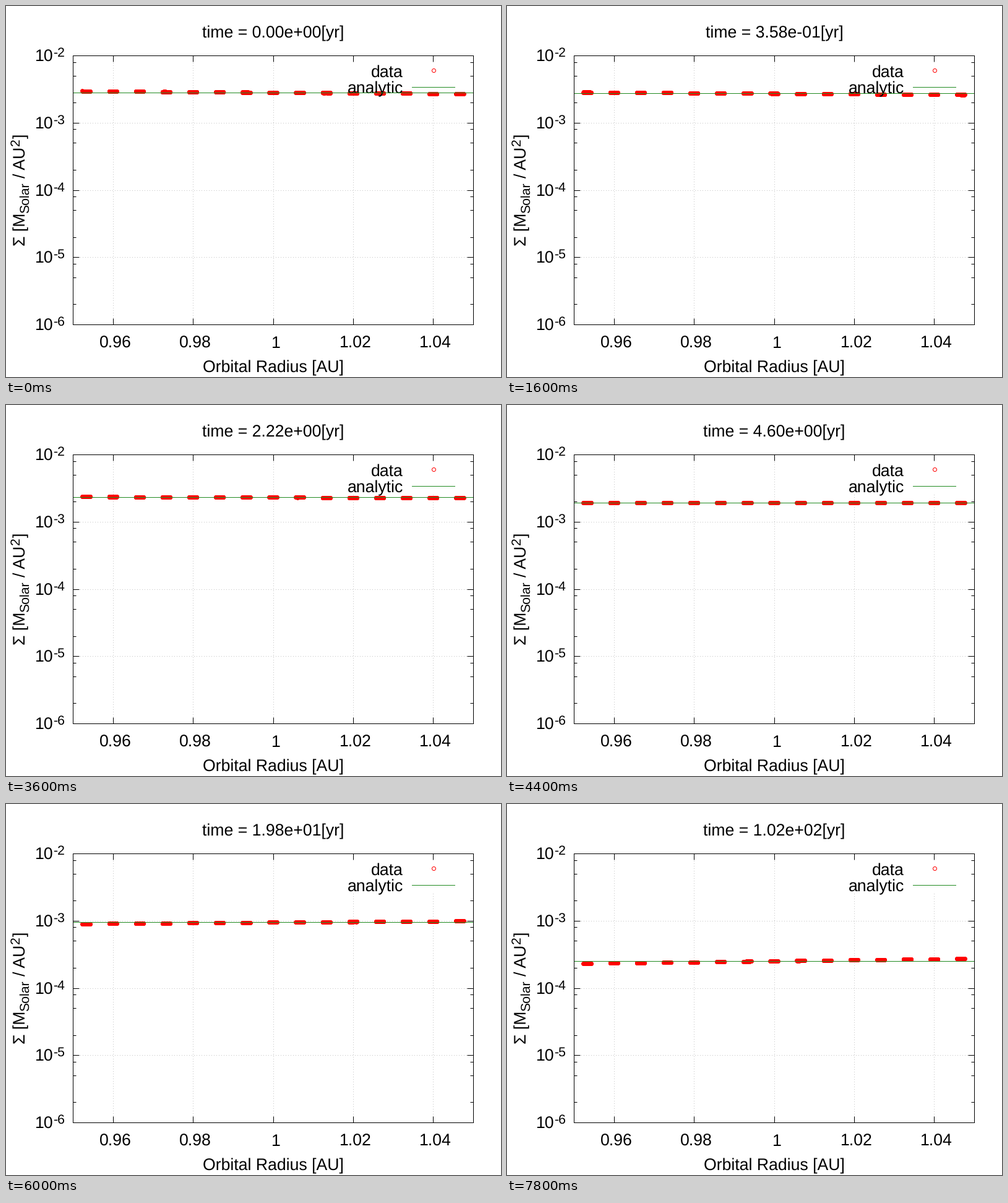
These frames come from a looping animation (800 px wide and 600 px high, 8 s). A matplotlib script:

```python
import numpy as np
import matplotlib.pyplot as plt
from matplotlib.animation import FuncAnimation
from matplotlib.collections import EllipseCollection

PX = 0.72                      # one pixel in points at 100 dpi
FRAMES, INTERVAL = 40, 200
LEFT, RIGHT, TOP, BOTTOM = 108.5, 755.5, 80.5, 515.5
DECADE = (BOTTOM - TOP) / 4
FONT, SMALL = 26.67, 21.33
RED, GREEN, GREY = "#ff0000", "#228b22", "#c4c4c4"

BINS = 15                      # radial bins over 0.95 .. 1.05 AU
POINTS = 60                    # particles drawn per bin
SIGMA0 = 2.817e-3              # surface density at 1 AU and t = 0
TAU = 10.0                     # decay time at 1 AU, grows as r^3

plt.rcParams["font.family"] = "Liberation Sans"
plt.rcParams["text.hinting"] = "none"
fig = plt.figure(figsize=(8, 6), dpi=100, facecolor="white")
ax = fig.add_axes([0, 0, 1, 1])
ax.set_xlim(0, 800)
ax.set_ylim(600, 0)
ax.axis("off")


def x_of(r):
    return LEFT + (r - 0.95) / 0.1 * (RIGHT - LEFT)


def y_of(sigma):
    return TOP - (np.log10(sigma) + 2) * DECADE


def snap(v):
    """Centre of the pixel that holds v."""
    return np.floor(v) + 0.5


def density(r, t):
    return SIGMA0 / r / (1 + t / (TAU * r**3))


def year(i):
    return 0.1 * 1.2 ** (i - 1) if i else 0.0


def line(x0, y0, x1, y1, color="black", z=5, **kw):
    # Coordinates are pixel centres already, so the renderer must not snap.
    return ax.plot([x0, x1], [y0, y1], color=color, lw=PX, zorder=z,
                   solid_capstyle="butt", dash_capstyle="butt",
                   snap=False, **kw)[0]


def text(x, y, s, size=FONT, ha="left", z=3, **kw):
    return ax.text(x, y, s, fontsize=size * PX, ha=ha, va="baseline",
                   color="black", zorder=z, **kw)


def grid(x0, y0, x1, y1):
    line(x0, y0, x1, y1, GREY, 1, linestyle=(0, (1, 3)))


def side_ticks(y, size):
    line(LEFT, y, LEFT + size, y)
    line(RIGHT, y, RIGHT - size, y)


def draw_frame():
    for x in (LEFT, RIGHT):
        line(x, TOP - 0.5, x, BOTTOM + 0.5)
    for y in (TOP, BOTTOM):
        line(LEFT - 0.5, y, RIGHT + 0.5, y)


def draw_x_axis():
    for r in (0.96, 0.98, 1.0, 1.02, 1.04):
        x = snap(x_of(r))
        line(x, BOTTOM, x, BOTTOM - 10)
        line(x, TOP, x, TOP + 10)
        if r > 1.01:           # leave room for the key
            grid(x, TOP - 0.5, x, 91)
            grid(x, 145, x, BOTTOM)
        else:
            grid(x, TOP - 0.5, x, BOTTOM)
        text(x + 3.7, 553, f"{r:g}", ha="center")
    text(432, 592, "Orbital Radius [AU]", ha="center")


def draw_y_axis():
    for p in range(-6, -1):
        y = snap(y_of(10.0**p))
        side_ticks(y, 10)
        text(46.5, y + 9.5, "10")
        text(76, y + 1.5, f"{p}", SMALL)
        if p == -2:
            continue
        if p > -6:
            grid(LEFT - 0.5, y, RIGHT, y)
        for m in (2, 5, 8):
            side_ticks(snap(y_of(m * 10.0**p)), 5)


def draw_y_label():
    parts = [(31, 388.5, "Σ [M", FONT), (37, 335, "Solar", SMALL),
             (31, 277.8, "/ AU", FONT), (22, 226, "2", SMALL),
             (31, 214, "]", FONT)]
    for x, y, s, size in parts:
        text(x, y, s, size, rotation=90, rotation_mode="anchor")


def circles(x, y, z):
    rings = EllipseCollection(
        np.full(len(x), 6), np.full(len(x), 6), np.zeros(len(x)),
        units="dots", offsets=np.column_stack([x, y]),
        offset_transform=ax.transData, facecolors="none", edgecolors=RED,
        linewidths=PX, zorder=z)
    rings.set_snap(False)
    return ax.add_collection(rings, autolim=False)


draw_frame()
draw_x_axis()
draw_y_axis()
draw_y_label()
text(642, 115, "data", ha="right")
text(642, 141, "analytic", ha="right")
circles([691.5], [104.5], 4)
line(656, 131.5, 726, 131.5, GREEN, 4)

centres = 0.95 + (np.arange(BINS) + 0.5) * 0.1 / BINS
spread = np.linspace(-0.00095, 0.00095, POINTS)
radii = (centres[:, None] + spread).ravel()
columns = snap(x_of(radii))

title = text(432, 51, "", ha="center")
data = circles(columns, np.zeros(radii.size), 2)
analytic = line(LEFT, 0, RIGHT, 0, GREEN, 4)


def update(i):
    t = year(i)
    noise = np.random.default_rng(100 + i).normal(0, 0.03, radii.size)
    rows = snap(y_of(density(radii, t)) + noise)
    data.set_offsets(np.column_stack([columns, rows]))
    y = snap(y_of(density(1.0, t)))
    analytic.set_ydata([y, y])
    title.set_text(f"time = {t:.2e}[yr]")
    return data, analytic, title


anim = FuncAnimation(fig, update, frames=FRAMES, interval=INTERVAL,
                     init_func=lambda: update(0), repeat=True,
                     repeat_delay=0, blit=False)
plt.show()
```
